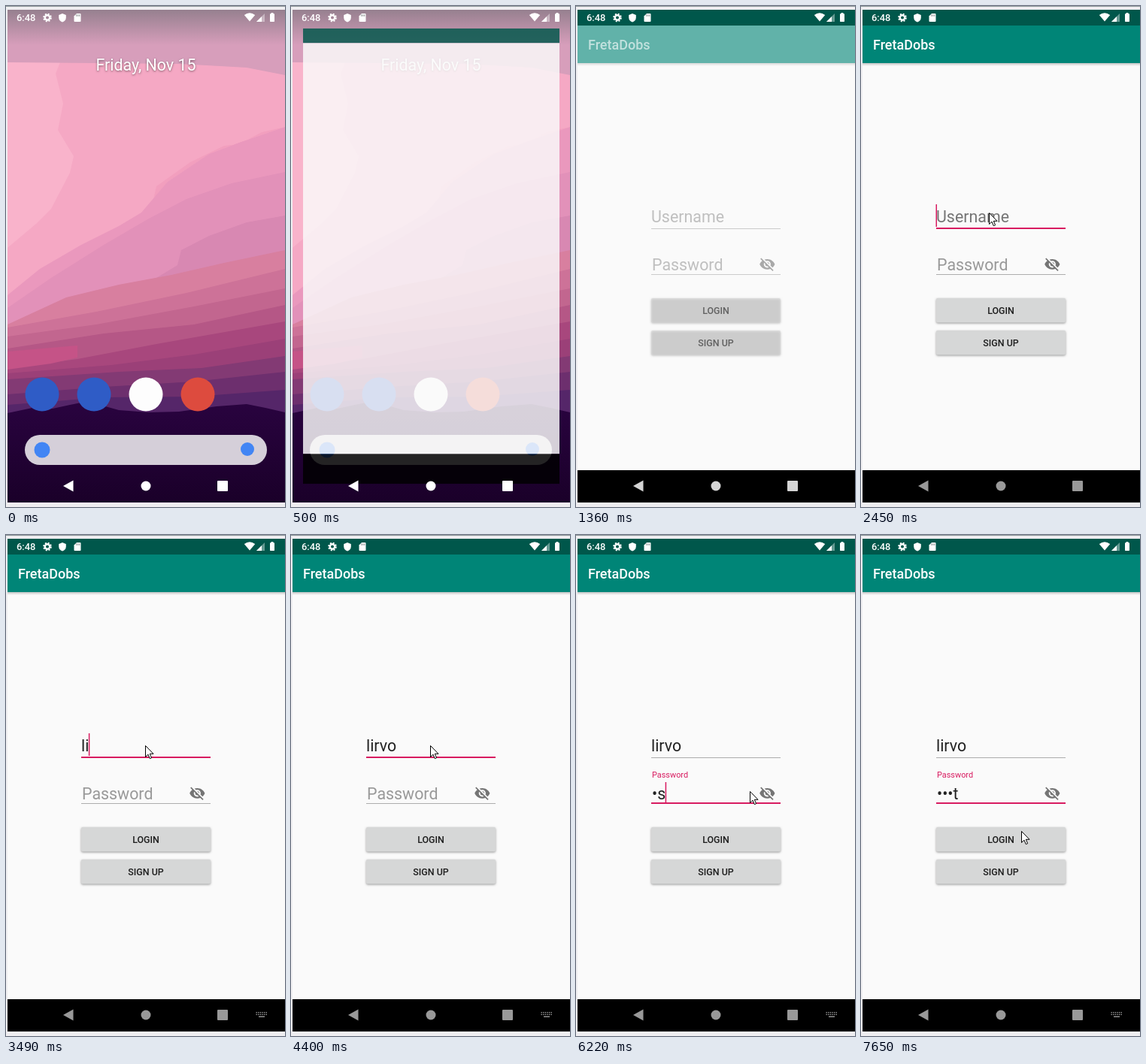
An HTML page with a canvas that plays this animation: 371x667 px, repeating every 8 s.

```html
<!DOCTYPE html>
<html lang="en">
<head>
<meta charset="utf-8">
<style>
html, body { margin: 0; width: 100%; height: 100%; overflow: hidden; background: #efeef1; }
canvas { display: block; }
</style>
</head>
<body>
<canvas id="stage" width="371" height="667"></canvas>
<script>
const g = document.getElementById('stage').getContext('2d');
const PINK = '#d81b60';
const LOOP = 8000;
const TITLE = 'FretaDobs';
const USER = 'lirvo';

// Value of the last step whose start time has passed.
const at = (t, steps) => {
  let value = steps[0][1];
  for (const [start, v] of steps) if (t >= start) value = v;
  return value;
};

const rect = (color, x, y, w, h) => { g.fillStyle = color; g.fillRect(x, y, w, h); };
const shape = (color, d) => { g.fillStyle = color; g.fill(new Path2D(d)); };
const disc = (color, x, y, r) => {
  g.fillStyle = color;
  g.beginPath();
  g.arc(x, y, r, 0, 7);
  g.fill();
};
const pill = (color, x, y, w, h, r) => {
  g.fillStyle = color;
  g.beginPath();
  g.roundRect(x, y, w, h, r);
  g.fill();
};
const text = (s, x, y, size, color, weight = 400, align = 'left') => {
  g.font = `${weight} ${size}px Roboto, sans-serif`;
  g.textAlign = align;
  g.fillStyle = color;
  g.fillText(s, x, y);
  return g.measureText(s).width;
};
const withShadow = (color, blur, dy, draw) => {
  g.save();
  g.shadowColor = color;
  g.shadowBlur = blur;
  g.shadowOffsetY = dy;
  draw();
  g.restore();
};
const vertical = (y0, y1, from, to) => {
  const grad = g.createLinearGradient(0, y0, 0, y1);
  grad.addColorStop(0, from);
  grad.addColorStop(1, to);
  return grad;
};

// Sky layers: colour and upper outline, each filled down to the bottom.
const SKY = [
  ['#ea98bd', 'M2 385L45 350 100 318 150 293 180 275 215 234 270 197 310 182 371 161'],
  ['#e291b9', 'M2 402L60 362 130 318 190 283 240 257 300 236 371 221'],
  ['#d888b2', 'M2 424L110 388 200 362 228 345 233 325 270 306 320 288 371 279'],
  ['#d87f9f', 'M2 424L80 388 150 371 220 358 290 342 371 325'],
  ['#cd7298', 'M2 428L120 407 240 382 371 350'],
  ['#c2668f', 'M2 440L120 424 250 400 371 376'],
  ['#b55786', 'M2 456L130 436 250 424 371 398'],
  ['#a8477d', 'M2 482L95 470 200 450 371 420'],
  ['#9b4078', 'M2 489L140 478 250 464 371 443'],
  ['#833a74', 'M2 497L150 487 260 482 371 466'],
  ['#6d2f6e', 'M2 517L130 507 250 500 371 487'],
  ['#552669', 'M2 531L130 521 250 520 371 511']
];

function wallpaper() {
  rect('#f5a8c4', 2, 5, 369, 656);
  shape('#f9b3cb', 'M2 75H72L66 90 76 130 69 165 90 200 85 222 60 270 40 290 2 322Z');
  shape('#f29fbe', 'M371 161L310 182 270 197 215 234 195 262 200 240 245 208 290 186 310 184 340 168Z');
  for (const [color, outline] of SKY) shape(color, outline + 'V661H2Z');
  shape('#c55387', 'M2 460L95 452V468L60 476 2 484Z');
  shape('#d79ebb', 'M2 48H371V92L320 82 230 77 2 75Z');
  rect(vertical(5, 52, '#96808f', '#d79ebb'), 2, 5, 369, 47);
  shape(vertical(530, 661, '#29033f', '#1a0029'),
    'M2 542L35 535 62 536 85 531 105 527 125 531 150 538 190 541 230 540 280 533 320 530 345 535 371 541V661H2Z');
}

function home() {
  wallpaper();
  withShadow('rgba(0,0,0,.5)', 3, 1, () => text('Friday, Nov 15', 186, 86, 21.4, '#fff', 400, 'center'));
  ['#2f5cc6', '#2f5cc6', '#fdfdfd', '#dd4b3e'].forEach((color, i) => disc(color, 48 + 69 * i, 517, 22.5));
  pill('#d5cfd9', 25, 571, 322, 40, 20);
  disc('#4285f4', 48, 591, 10.5);
  disc('#4285f4', 321, 590, 9);
}

// Empty app window growing out of the centre.
function appWindow(scale, alpha) {
  g.save();
  g.globalAlpha = alpha;
  g.translate(186.5, 333);
  g.scale(scale, scale);
  g.translate(-186.5, -333);
  rect('#00574b', 2, 5, 369, 21);
  rect('#fafafa', 2, 26, 369, 592);
  rect('#000', 2, 618, 369, 43);
  g.restore();
}

function underline(y, focused) {
  if (focused) rect(PINK, 100, y - 1, 172, 2);
  else rect('#adadad', 100, y, 172, 1);
}

function button(label, y) {
  withShadow('rgba(0,0,0,.4)', 3, 1, () => pill('#d6d7d7', 100, y, 172, 32.5, 2));
  text(label, 186, y + 21, 12.4, '#1d1d1d', 500, 'center');
}

const EYE_OFF = 'M12 7c2.76 0 5 2.24 5 5 0 .65-.13 1.26-.36 1.83l2.92 2.92c1.51-1.26 2.7-2.89 3.43-4.75-1.73-4.39-6-7.5-11-7.5-1.4 0-2.74.25-3.98.7l2.16 2.16C10.74 7.13 11.35 7 12 7zM2 4.27l2.74 2.74C3.08 8.3 1.78 10.02 1 12c1.73 4.39 6 7.5 11 7.5 1.55 0 3.03-.3 4.38-.84L19.73 22 21 20.73 3.27 3 2 4.27zM7.53 9.8l1.55 1.55c-.05.21-.08.43-.08.65 0 1.66 1.34 3 3 3 .22 0 .44-.03.65-.08l1.55 1.55c-.67.33-1.41.53-2.2.53-2.76 0-5-2.24-5-5 0-.79.2-1.53.53-2.2zm4.31-.78l3.15 3.15.02-.16c0-1.66-1.34-3-3-3l-.17.01z';

function eyeIcon() {
  g.save();
  g.translate(243.3, 332.8);
  g.scale(.92, .92);
  shape('#757575', EYE_OFF);
  g.restore();
}

function username(t) {
  const typed = at(t, [[0, 0], [3240, 1], [3490, 2], [3610, 3], [3730, 4], [3850, 5]]);
  const caret = at(t, [[0, 0], [2450, 1], [2970, 0], [3240, 1], [4400, 0], [4930, 1], [5170, 0]]);
  const pressed = t >= 2330 && t < 2600;
  const width = text(USER.slice(0, typed), 100, 288, 21.3, '#212121');
  if (!typed) text('Username', 100, 288, 21.4, pressed ? '#757575' : '#999');
  underline(296, t >= 2330 && t < 5170);
  if (caret) rect(PINK, 99.5 + width, 264, 1.5, 30);
}

function password(t) {
  const typed = at(t, [[0, ''], [5710, 't'], [5980, '•'], [6100, '•s'], [6360, '•'], [6490, '•e'],
    [6750, '••s'], [6990, '•••t']]);
  const caret = t >= 5290 && t < 7530;
  const [size, y, color] = at(t, [[0, [21.4, 352, '#999']], [5440, [16, 337, '#b25a7c']], [5560, [10.9, 323, PINK]]]);
  text('Password', 101, y, size, color);
  const width = text(typed, 101, 352, 21.3, '#212121');
  underline(357, t >= 5170);
  if (caret) rect(PINK, 100.5 + width, 329, 1.5, 29);
  eyeIcon();
}

function loginScreen(t) {
  g.save();
  g.globalAlpha = at(t, [[0, .61], [1490, .85], [1610, 1]]);
  rect(vertical(76, 80, 'rgba(0,0,0,.22)', 'rgba(0,0,0,0)'), 2, 76, 369, 4);
  rect('#008577', 2, 26, 369, 50);
  text(TITLE, 16, 58, 18, '#fff', 500);
  username(t);
  password(t);
  button('LOGIN', 389);
  button('SIGN UP', 432);
  g.restore();
}

function statusIcons() {
  const white = '#fff';
  text('6:48', 14, 20, 12.9, white, 500);
  g.strokeStyle = white;
  for (const [r, width, dash] of [[3.2, 2.4, []], [4.9, 1.8, [2.1, 1.75]]]) {
    g.beginPath();
    g.arc(55, 15.5, r, 0, 2 * Math.PI);
    g.lineWidth = width;
    g.setLineDash(dash);
    g.stroke();
  }
  g.setLineDash([]);
  shape(white, 'M75 10L79.8 12V15.5Q79.5 20 75 21.5Q70.5 20 70.2 15.5V12Z');
  shape(white, 'M94 10H98.5Q99.5 10 99.5 11V20Q99.5 21 98.5 21H91.5Q90.5 21 90.5 20V13.5Z');
  for (const x of [93.2, 95.2, 97.2]) rect('#8a8f90', x, 11.3, 1, 2.5);
  shape(white, 'M324 20.5L316.8 12Q324 6.5 331.2 12Z');
  shape('rgba(255,255,255,.4)', 'M333 21H344V10Z');
  shape(white, 'M333 21H340V14Z');
  shape(white, 'M351 11Q351 10.3 351.7 10.3H352.6V9H355.4V10.3H356.3Q357 10.3 357 11V20.3Q357 21 356.3 21H351.7Q351 21 351 20.3Z');
}

function navIcons(t) {
  const color = at(t, [[0, '#fff'], [1060, '#e6e6e6'], [1210, '#d4d4d4'], [1910, '#999']]);
  shape(color, 'M76 639L89.5 631.5V646.5Z');
  disc(color, 186, 639, 6.5);
  pill(color, 281, 632, 14, 14, 1);
  if (t < 2600) return;
  for (let row = 0; row < 2; row++)
    for (let i = 0; i < 6; i++) rect(color, 332.5 + 2.6 * i, 635 + 2.7 * row, 1.4, 1.4);
  rect(color, 336, 640.6, 8, 1.4);
}

const MOUSE = [
  [1910, [248, 186]], [2060, [142, 338]], [2180, [162, 283]], [2330, [170, 275]], [2600, [185, 280]],
  [4650, [201, 302]], [4930, [222, 326]], [5050, [231, 335]], [6100, [238, 322]], [6220, [231, 341]],
  [6360, [232, 345]], [6490, [220, 355]], [6610, [208, 363]], [6870, [205, 368]], [7110, [203, 370]],
  [7380, [208, 383]], [7530, [211, 390]], [7650, [213, 394]]
];

function mouse(t) {
  if (t < MOUSE[0][0]) return;
  const [x, y] = at(t, MOUSE);
  const arrow = new Path2D('M.5 .5V15.5L4 12.2 6.3 17.7 8.6 16.7 6.3 11.3H11Z');
  g.save();
  g.translate(x, y);
  g.fillStyle = '#fff';
  g.strokeStyle = '#000';
  g.lineWidth = 1;
  g.fill(arrow);
  g.stroke(arrow);
  g.restore();
}

function draw(t) {
  rect('#efeef1', 0, 0, 371, 667);
  rect('#8b9697', 0, 0, 371, 1);
  if (t < 780) home();
  if (t >= 500) appWindow(...at(t, [[500, [.924, .83]], [630, [.985, 1]], [780, [1, 1]]]));
  if (t >= 1360) loginScreen(t);
  statusIcons();
  navIcons(t);
  mouse(t);
}

const start = performance.now();
function tick() {
  draw((performance.now() - start) % LOOP);
  requestAnimationFrame(tick);
}
tick();
</script>
</body>
</html>
```
